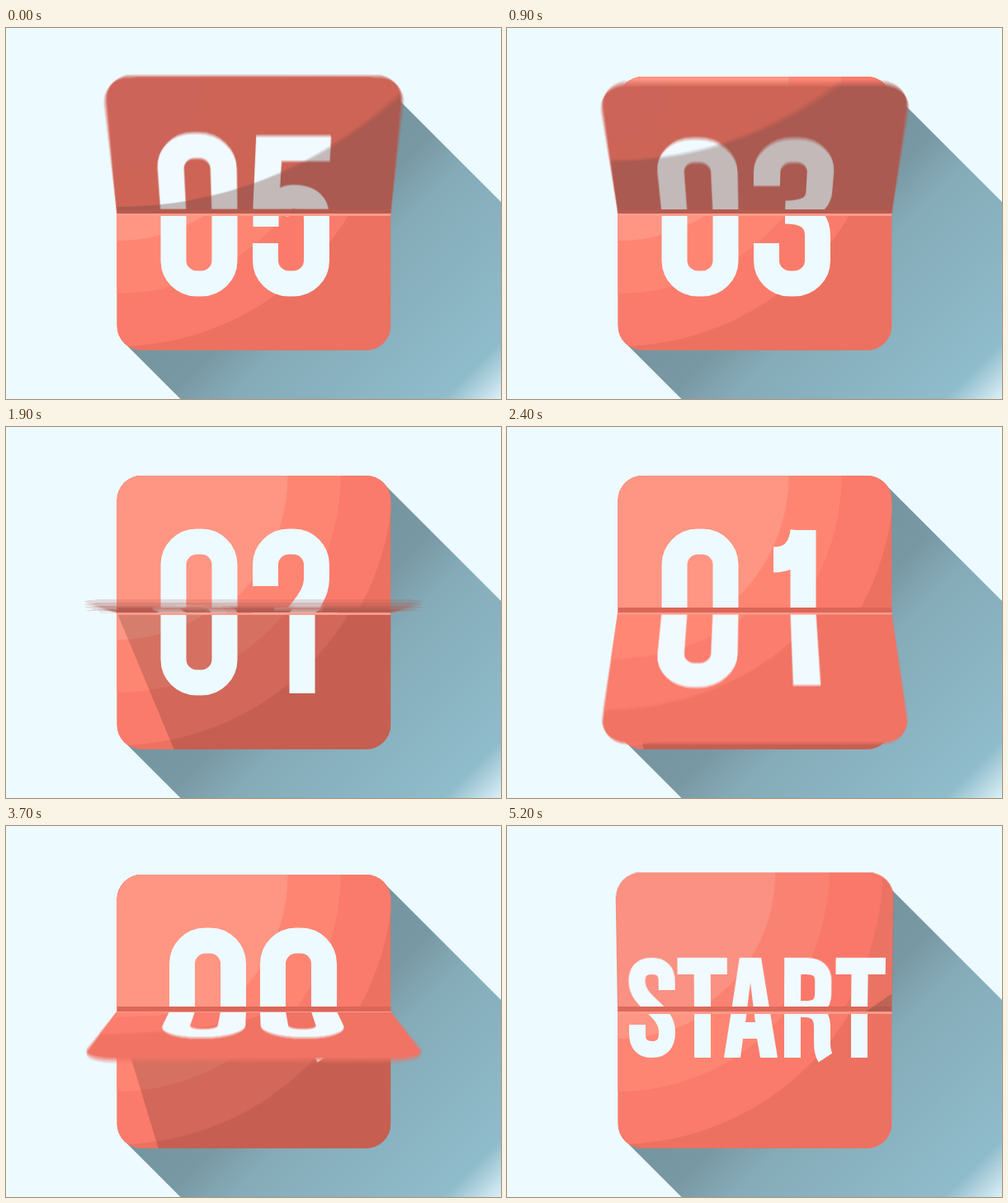
Write an HTML page with a canvas that moves like this. It is 600x450 px and loops after 5.3 s.

```html
<!DOCTYPE html>
<html lang="en">
<head>
<meta charset="utf-8">
<title>Flip countdown</title>
<style>
html, body { margin: 0; width: 100%; height: 100%; overflow: hidden; background: #edfaff; }
canvas { display: block; }
</style>
</head>
<body>
<canvas id="stage" width="600" height="450"></canvas>
<script>
const LOOP = 5300, STEP = 100, SHUTTER = 17, SAMPLES = 5;
const LEFT = 134.5, TOP = 59, SIZE = 332, HALF = 166, HINGE = 225, MID = 300.5, DEPTH = 736;
const WHITE = '#edfaff';
const LABELS = ['START', '00', '01', '02', '03', '04', '05'];

const ARCH = 'V43a28 28 0 0 1 28-28h6a28 28 0 0 1 28 28';
const BOWL = 'a28 28 0 0 1-28 28h-6a28 28 0 0 1-28-28';
const DIGITS = {
  0: { stroke: `M15.5 158${ARCH}v115${BOWL}z` },
  1: { stroke: 'M60 1V199M24 37Q56 37 60 2' },
  2: { stroke: `M15.5 69${ARCH}V60C77.5 100 15.5 125 15.5 184H91` },
  3: { stroke: `M15.5 62${ARCH}v27q0 28-39.5 28q39.5 0 39.5 30v30${BOWL}v-21` },
  4: { fill: 'M50 3H84V136H97V164H84V198H52V164H-7V138ZM52 64V136H22Z' },
  5: { stroke: `M90 18.5H19L16 90V117M28 102Q32 79 48 79Q77.5 79 77.5 108V158${BOWL}V137` }
};
const START = {
  stroke: 'M194 199V188Q194 170 176 170Q158 170 158 189C158 215 194 222 194 250Q194 271 176 271Q158 271 158 252V241' +
    'M207 170H267M237 170V281M346 160V281M346 170H362Q383 170 383 188V204Q383 222 362 222H346' +
    'M364 222Q382 224 382 244V262Q382 275 386 281M398 170H458M427 170V281',
  fill: 'M263 281 282 160H308L328 281H307L303 258H286L283 281ZM289 238H301L295 190Z'
};

const makeCanvas = () => Object.assign(document.createElement('canvas'), { width: 600, height: 450 }).getContext('2d');
const stage = document.getElementById('stage').getContext('2d');
const oldFace = makeCanvas(), newFace = makeCanvas(), blur = makeCanvas();
const clamp = (v, lo, hi) => Math.min(hi, Math.max(lo, v));

// Degrees of flipping still to go: the whole countdown slows down like a spinning wheel.
const remaining = t => (0.00428 * (5647 - t)) ** 2.2;

function glyph(c, { stroke, fill }, x, y, weight) {
  c.save();
  c.translate(x, y);
  c.lineWidth = weight;
  c.strokeStyle = c.fillStyle = WHITE;
  if (stroke) c.stroke(new Path2D(stroke));
  if (fill) c.fill(new Path2D(fill), 'evenodd');
  c.restore();
}

function drawLabel(c, label) {
  if (label === 'START') return glyph(c, START, 0, 0, 20);
  const xs = label === '00' ? [198, 308] : [187.5, 299];
  xs.forEach((x, i) => glyph(c, DIGITS[label[i]], x, 124, 31));
}

// One half of the card; bandShift moves the light rings, under and over add shade around the label.
function drawHalf(c, label, isTop, { bandShift = 0, under, over } = {}) {
  c.save();
  c.beginPath();
  c.roundRect(LEFT, TOP, SIZE, HALF * 2, 30);
  c.clip();
  c.beginPath();
  c.rect(0, isTop ? TOP : HINGE, 600, HALF);
  c.clip();
  c.fillStyle = '#ec7161';
  c.fillRect(LEFT, TOP, SIZE, HALF * 2);
  ['#fa7b6b', '#ff8573', '#ff9583'].forEach((color, i) => {
    c.fillStyle = color;
    c.beginPath();
    c.arc(LEFT, TOP, Math.max(0, (isTop ? 335 : 327) - i * 64 - bandShift), 0, 7);
    c.fill();
  });
  if (under) under(c);
  drawLabel(c, label);
  c.fillStyle = isTop ? '#dc6658' : '#ff9b8a';
  c.fillRect(LEFT, isTop ? 219 : HINGE, SIZE, isTop ? 6 : 3);
  if (over) over(c);
  c.restore();
}

function drawLongShadow(c) {
  const g = c.createLinearGradient(275, 275, 525, 525);
  [[0, '#7595a0'], [0.18, '#7898a3'], [0.34, '#85abb8'], [0.86, '#8fbccb'], [1, '#dcf0f7']]
    .forEach(([at, color]) => g.addColorStop(at, color));
  c.fillStyle = g;
  c.beginPath();
  [[457, 68], [857, 468], [543, 781.5], [143, 381.5]].forEach(p => c.lineTo(...p));
  c.fill();
}

// Perspective projection of a half card, row by row.
function drawFlap(c, angle) {
  const up = angle > 90, face = (up ? newFace : oldFace).canvas;
  const rad = angle * Math.PI / 180, sin = Math.sin(rad), cos = Math.abs(Math.cos(rad));
  const along = y => y * DEPTH / (cos * DEPTH + y * sin);
  const height = HALF * cos * DEPTH / (DEPTH - HALF * sin);
  for (let y = 0; y < height; y++) {
    const u = along(y), span = along(Math.min(y + 1, height)) - u;
    const scale = DEPTH / (DEPTH - (u + span / 2) * sin);
    c.drawImage(face, 0, up ? HINGE - u - span : HINGE + u, 600, span,
      MID * (1 - scale), up ? HINGE - y - 1 : HINGE + y, 600 * scale, 1);
  }
}

function draw(t) {
  const left = remaining(t), index = Math.floor(left / 180), angle = 180 - left % 180;
  const next = LABELS[index], previous = LABELS[(index + 1) % LABELS.length];

  stage.fillStyle = WHITE;
  stage.fillRect(0, 0, 600, 450);
  drawLongShadow(stage);
  drawHalf(stage, previous, true);
  drawHalf(stage, next, false, {
    under(c) {
      const slope = Math.max(0, 7 - 0.05 * angle);
      c.fillStyle = `rgba(0,0,0,${clamp((156 - angle) * 0.004, 0, 0.16)})`;
      c.beginPath();
      c.moveTo(LEFT, HINGE);
      c.lineTo(LEFT + SIZE, HINGE);
      c.lineTo(LEFT + SIZE, HINGE + slope * SIZE);
      c.fill();
    }
  });

  oldFace.clearRect(0, 0, 600, 450);
  newFace.clearRect(0, 0, 600, 450);
  drawHalf(oldFace, previous, false, { bandShift: angle });
  drawHalf(newFace, next, true, {
    bandShift: (180 - angle) * 4,
    under(c) {
      c.fillStyle = `rgba(198,95,83,${clamp((178 - angle) / 22, 0, 0.93)})`;
      c.fillRect(LEFT, TOP, SIZE, HALF);
    },
    over(c) {
      const lit = Math.max(0, 561 - 1.33 * Math.max(0, 177 - angle) ** 1.4);
      c.fillStyle = 'rgba(110,69,63,.36)';
      c.beginPath();
      c.rect(LEFT, TOP, SIZE, HALF);
      c.moveTo(LEFT + lit, -247);
      c.arc(LEFT, -247, lit, 0, 2 * Math.PI);
      c.fill('evenodd');
    }
  });

  blur.clearRect(0, 0, 600, 450);
  blur.globalCompositeOperation = 'lighter';
  blur.globalAlpha = 1 / SAMPLES;
  for (let i = 0; i < SAMPLES; i++) {
    const moment = t + SHUTTER * (i / (SAMPLES - 1) - 0.5);
    drawFlap(blur, clamp(angle + left - remaining(moment), 0, 180));
  }
  stage.drawImage(blur.canvas, 0, 0);
}

let shown = -1;
const begin = performance.now();
function tick() {
  const t = Math.floor((performance.now() - begin) % LOOP / STEP) * STEP;
  if (t !== shown) draw(shown = t);
  requestAnimationFrame(tick);
}
tick();
</script>
</body>
</html>
```
